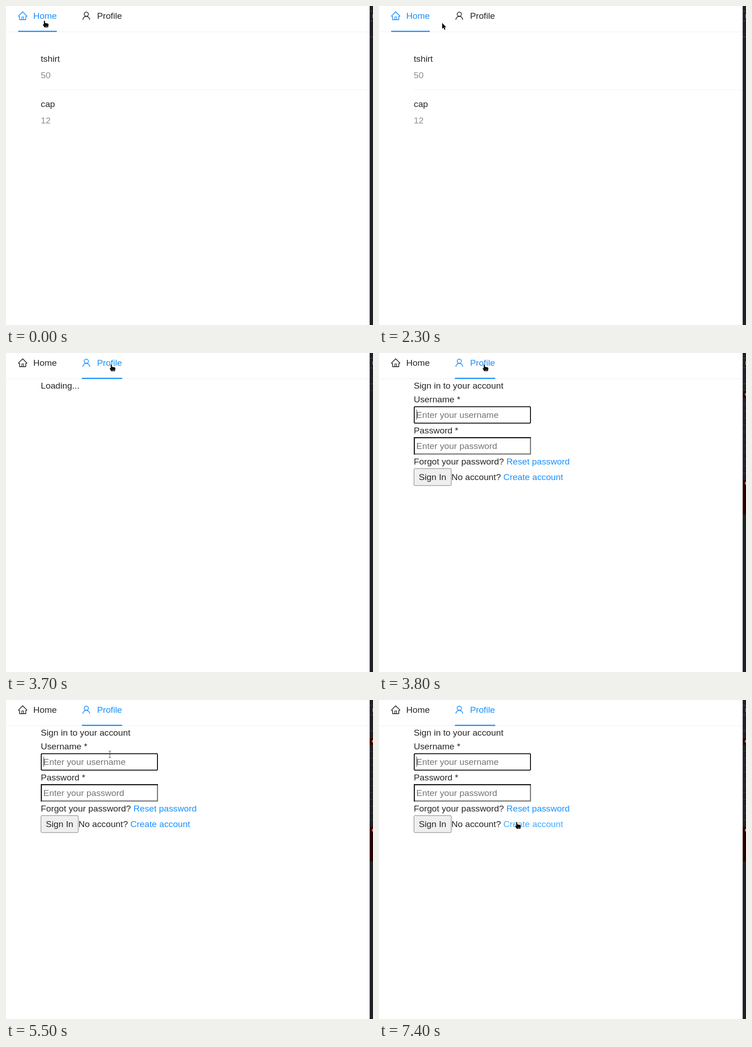
Recreate the animation shown at these times as an HTML page. Size 802 px wide and 698 px high, loop 8 s.

```html
<!DOCTYPE html>
<html lang="en">
<head>
<meta charset="utf-8">
<title>Tabs and sign in</title>
<style>
html, body { margin: 0; width: 100%; height: 100%; overflow: hidden; background: #fff; }
svg { display: block; font: 19.25px "Liberation Sans", Arial, sans-serif; fill: #262626; }
.muted { fill: #8c8c8c; }
.hint { fill: #757575; }
.link { fill: #1890ff; }
.icon { fill: none; stroke-width: 72; stroke-linejoin: round; }
.crisp { shape-rendering: crispEdges; }
</style>
</head>
<body>
<svg width="802" height="698" viewBox="0 0 802 698">
  <rect class="crisp" y="56" width="795" height="1" fill="#f0f0f0"/>
  <rect id="ink" y="54.2" height="2.6" fill="#1890ff"/>

  <g id="homeIcon" class="icon" transform="translate(25.2 10) scale(.022)">
    <path d="M512 122L102 532Q84 578 124 578H202V904H822V578H901Q940 578 922 532Z"/>
    <path d="M424 904V632H600V904" stroke-width="64"/>
  </g>
  <text id="homeText" x="59.6" y="28">Home</text>
  <g id="userIcon" class="icon" transform="translate(164.2 10) scale(.022)">
    <circle cx="512" cy="362" r="210"/>
    <path d="M174 910A338 338 0 0 1 850 910"/>
  </g>
  <text id="userText" x="198.9" y="28">Profile</text>

  <g id="list">
    <text x="76" y="122">tshirt</text>
    <text x="76" y="157.5" class="muted">50</text>
    <rect class="crisp" x="76" y="183" width="719" height="1" fill="#f0f0f0"/>
    <text x="76" y="221">cap</text>
    <text x="76" y="257" class="muted">12</text>
  </g>

  <text id="loading" x="76" y="78">Loading...</text>

  <g id="form">
    <text x="76" y="78">Sign in to your account</text>
    <text x="76" y="108">Username *</text>
    <rect x="77" y="117.5" width="254" height="36" rx="2" fill="#fff" stroke="#101010" stroke-width="2"/>
    <text x="81.6" y="142" class="hint">Enter your username</text>
    <rect id="caret" class="crisp" x="82" y="124" width="1" height="22" fill="#333"/>
    <text x="76" y="176">Password *</text>
    <path d="M331 184V221H76" fill="none" stroke="#767676" stroke-width="2.4"/>
    <path d="M77.2 222V185.2H332" fill="none" stroke="#161616" stroke-width="2.4"/>
    <text x="81.6" y="210" class="hint">Enter your password</text>
    <text x="76" y="244">Forgot your password?</text>
    <text x="278.6" y="244" class="link">Reset password</text>
    <rect x="76.5" y="252.9" width="81.4" height="37.2" rx="2" fill="#efefef" stroke="#767676"/>
    <text x="87" y="278">Sign In</text>
    <text x="158.3" y="278">No account?</text>
    <text id="create" x="271.8" y="278" class="link">Create account</text>
  </g>

  <g class="crisp">
    <rect x="795" width="7" height="698" fill="#202124"/>
    <rect x="801" y="18" width="1" height="8" fill="#9aa0a6"/>
    <path d="M795 11.5h7M795 32.5h7M795 67.5h7" stroke="#4a4c50"/>
    <path id="row" d="M795 82.5h7" stroke="#3a3b3e"/>
    <g id="log">
      <path id="rows" stroke="#3a3b3e"/>
      <path d="M795 83h7v15h-7zM795 278h7v75h-7z" fill="#290000"/>
    </g>
    <rect x="794" width="1" height="698" fill="#b9babc"/>
  </g>
  <g id="dots" fill="#e46962">
    <circle cx="803" cy="90.5" r="3.5"/><circle cx="803" cy="285" r="3.5"/>
  </g>

  <g id="cursor">
    <path id="arrow" d="M0 0V13L3 10.3L5 15L7.2 14L5.2 9.6H9Z" fill="#0a0a0a" stroke="#fff" stroke-width="1.2" paint-order="stroke"/>
    <g id="hand">
      <path d="M-1.2 1Q0 -.8 1.2 1V5L7.6 6.4Q9.2 7 9 9L8 14.8H0L-3.3 9.4Q-3.6 7 -1.2 8.4Z" fill="#0a0a0a" stroke="#fff" stroke-width="1.4" paint-order="stroke"/>
      <path d="M2 12.8h5" stroke="#aaa"/>
    </g>
    <path id="beam" d="M-2.5 -7.5Q0 -7.5 0 -6V6Q0 7.5 -2.5 7.5M2.5 -7.5Q0 -7.5 0 -6M0 6Q0 7.5 2.5 7.5" fill="none" stroke="#444"/>
  </g>
</svg>
<script>
const $ = id => document.getElementById(id);
const LOOP = 8000, STEP = 100, HOVER = 2500, CLICK = 3250, READY = 3800;
const DARK = [38, 38, 38], BLUE = [24, 144, 255], LIGHT = [64, 169, 255];

// time, x, y, pointer shape
const path = [
  [0, 84, 32, "hand"], [200, 86, 38, "hand"], [400, 86, 38, "hand"],
  [500, 122, 60, "arrow"], [600, 153, 79, "arrow"], [700, 153, 79, "arrow"],
  [1000, 113, 68, "arrow"], [1200, 107, 54, "hand"], [1400, 105, 37, "hand"],
  [1500, 104, 41, "hand"], [2000, 104, 41, "hand"], [2100, 113, 40, "arrow"],
  [2300, 138, 37, "arrow"], [2500, 168, 34, "hand"], [2900, 230, 25, "hand"],
  [4600, 230, 25, "hand"], [4700, 229, 40, "hand"], [4800, 226, 56, "arrow"],
  [4900, 223, 66, "beam"], [5000, 224, 80, "arrow"], [5500, 227, 119, "beam"],
  [5700, 238, 152, "beam"], [5800, 246, 178, "arrow"], [5900, 255, 205, "beam"],
  [6000, 265, 234, "arrow"], [6200, 283, 282, "arrow"], [6300, 297, 274, "hand"],
  [6400, 308, 267, "hand"], [6600, 299, 267, "hand"], [6800, 301, 267, "hand"],
  [LOOP, 301, 267, "hand"]
];

const lerp = (a, b, p) => a + (b - a) * p;
const part = (t, start, length) => Math.min(1, Math.max(0, (t - start) / length));
const ease = p => p < .5 ? 4 * p ** 3 : 1 - 4 * (1 - p) ** 3;
const mix = (a, b, p) => `rgb(${a.map((v, i) => Math.round(lerp(v, b[i], p)))})`;
const show = (id, on) => { $(id).style.display = on ? "" : "none"; };

$("rows").setAttribute("d", Array.from({ length: 11 }, (_, i) => `M795 ${112.5 + 15 * i}h7`).join(""));

function moveCursor(t) {
  const i = path.findIndex(k => k[0] > t) - 1;
  const [t0, x0, y0, shape] = path[i], [t1, x1, y1] = path[i + 1];
  const p = (t - t0) / (t1 - t0);
  $("cursor").setAttribute("transform", `translate(${lerp(x0, x1, p)} ${lerp(y0, y1, p)})`);
  for (const id of ["arrow", "hand", "beam"]) show(id, id === shape);
}

function draw(t) {
  // icons inherit the label colour and trail behind it
  $("homeText").style.fill = mix(BLUE, DARK, ease(part(t, CLICK, 300)));
  $("homeIcon").style.stroke = mix(BLUE, DARK, ease(part(t, CLICK, 530)));
  $("userText").style.fill = mix(DARK, BLUE, ease(part(t, HOVER, 300)));
  $("userIcon").style.stroke = mix(DARK, BLUE, ease(part(t, HOVER, 500)));
  $("create").style.fill = mix(BLUE, LIGHT, part(t, 6200, 200));

  const slide = ease(part(t, CLICK, 300));
  $("ink").setAttribute("x", lerp(26.6, 165.9, slide));
  $("ink").setAttribute("width", lerp(84.3, 88, slide));

  const clicked = t > CLICK, ready = t >= READY;
  show("list", !clicked);
  show("loading", clicked && !ready);
  show("row", clicked);
  for (const id of ["form", "log", "dots"]) show(id, ready);
  show("caret", Math.floor((t - READY) / 600) % 2 === 0);
  moveCursor(t);
}

function frame(now) {
  draw(Math.floor(now % LOOP / STEP) * STEP);
  requestAnimationFrame(frame);
}
draw(0);
requestAnimationFrame(frame);
</script>
</body>
</html>
```
